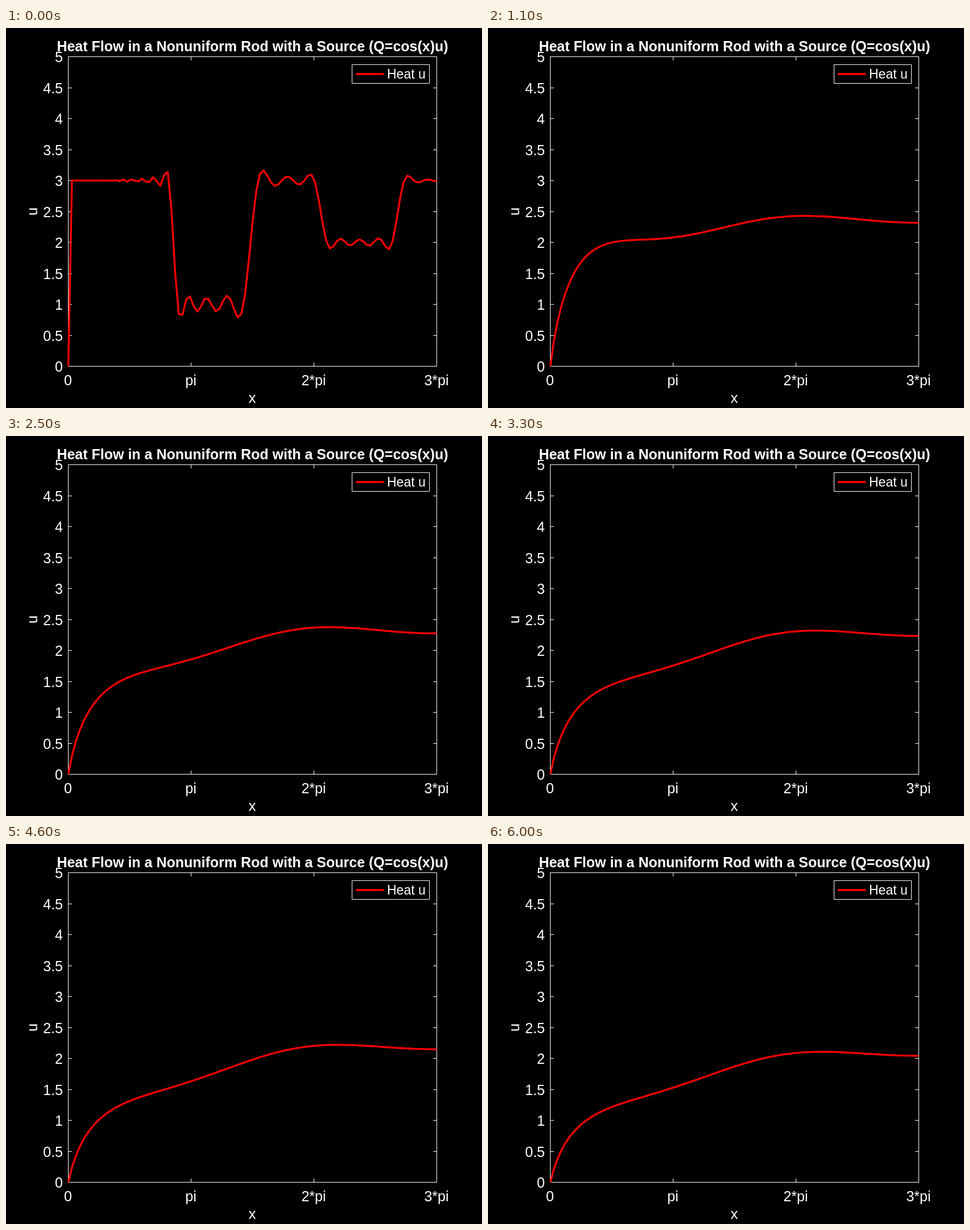
Recreate the animation shown at these times as an HTML page with a canvas. Size 837 by 669 pixels, loop 6100 ms.

```html
<!DOCTYPE html>
<html lang="en">
<head>
<meta charset="utf-8">
<title>Heat flow in a rod</title>
<style>
  html, body { margin: 0; width: 100%; height: 100%; overflow: hidden; background: #000; }
  canvas { display: block; }
</style>
</head>
<body>
<canvas id="stage" width="837" height="669"></canvas>
<script>
const ctx = document.getElementById('stage').getContext('2d');
const FONT = '"Liberation Sans", Arial, Helvetica, sans-serif';
const BOX = { left: 109.5, right: 757.5, top: 50.5, bottom: 595.5 };
const FRAME_MS = 100, FRAMES = 61;

// capacity * u_t = (conductivity * u_x)_x + cos(x) * u,  u = 0 on the left, u_x = 0 on the right.
const CELLS = 100, MODES = 50, H = 3 * Math.PI / CELLS;
const conductivity = x => 1 + 4 * x;
const capacity = x => 21 * (1.25 + 0.65 * Math.sin(x) + 0.165 * x);
const startHeat = s => s < 0.285 ? 3 : s < 0.495 ? 1 : s < 0.685 ? 3 : s < 0.895 ? 2 : 3;

// Eigenpairs of a symmetric matrix by Jacobi rotations, lowest value first.
function eigenpairs(a) {
  const n = a.length;
  const vectors = a.map((_, i) => a.map((_, j) => +(i === j)));
  const turn = (row1, row2, k1, k2, c, s) => {
    const p = row1[k1], q = row2[k2];
    row1[k1] = c * p - s * q;
    row2[k2] = s * p + c * q;
  };
  for (let sweep = 0; sweep < 12; sweep++) {
    for (let p = 0; p < n; p++) {
      for (let q = p + 1; q < n; q++) {
        if (Math.abs(a[p][q]) < 1e-11) continue;
        const theta = (a[q][q] - a[p][p]) / (2 * a[p][q]);
        const t = (theta < 0 ? -1 : 1) / (Math.abs(theta) + Math.hypot(theta, 1));
        const c = 1 / Math.hypot(t, 1), s = t * c;
        for (let k = 0; k < n; k++) turn(a[k], a[k], p, q, c, s);
        for (let k = 0; k < n; k++) {
          turn(a[p], a[q], k, k, c, s);
          turn(vectors[p], vectors[q], k, k, c, s);
        }
      }
    }
  }
  return vectors.map((vector, i) => ({ value: a[i][i], vector }))
    .sort((m, n) => m.value - n.value);
}

function buildModes() {
  const points = Array.from({ length: CELLS }, (_, i) => (i + 1) * H);
  const share = i => i === CELLS - 1 ? 0.5 : 1;
  const root = points.map((x, i) => Math.sqrt(capacity(x) * share(i)));
  const link = x => conductivity(x) / H ** 2;
  const matrix = points.map((x, i) => points.map((_, j) => {
    const right = i === CELLS - 1 ? 0 : link(x + H / 2);
    const entry = i === j ? link(x - H / 2) + right - Math.cos(x) * share(i)
      : j === i + 1 ? -right
      : j === i - 1 ? -link(x - H / 2) : 0;
    return entry / (root[i] * root[j]);
  }));
  return eigenpairs(matrix).slice(0, MODES).map(({ value, vector }) => {
    const weight = vector.reduce((sum, v, i) => sum + v * root[i] * startHeat((i + 1) / CELLS), 0);
    return { decay: value, shape: vector.map((v, i) => weight * v / root[i]) };
  });
}

const modes = buildModes();

function heatProfile(time) {
  const heat = new Array(CELLS + 1).fill(0);
  for (const { decay, shape } of modes) {
    const fade = Math.exp(-decay * time);
    shape.forEach((v, i) => { heat[i + 1] += v * fade; });
  }
  return heat;
}

const plotX = i => BOX.left + (BOX.right - BOX.left) * i / CELLS;
const plotY = u => BOX.bottom - (BOX.bottom - BOX.top) * u / 5;

function text(str, x, y, size, align = 'center', weight = '') {
  ctx.font = `${weight} ${size}px ${FONT}`;
  ctx.textAlign = align;
  ctx.fillText(str, x, y);
}

function line(x1, y1, x2, y2) {
  ctx.beginPath();
  ctx.moveTo(x1, y1);
  ctx.lineTo(x2, y2);
  ctx.stroke();
}

function drawAxes() {
  const { left, right, top, bottom } = BOX, tick = 6.5;
  ctx.strokeStyle = ctx.fillStyle = '#fff';
  ctx.lineWidth = 1;
  ctx.strokeRect(left, top, right - left, bottom - top);
  for (let k = 0; k <= 10; k++) {
    const y = Math.round(plotY(k / 2) - 0.5) + 0.5;
    line(left, y, left + tick, y);
    line(right, y, right - tick, y);
    text(String(k / 2), 100, y + 9, 25, 'right');
  }
  ['0', 'pi', '2*pi', '3*pi'].forEach((label, k) => {
    const x = left + (right - left) * k / 3;
    line(x, bottom, x, bottom - tick);
    line(x, top, x, top + tick);
    text(label, x - 0.5, 628.5, 25);
  });
  text('Heat Flow in a Nonuniform Rod with a Source (Q=cos(x)u)', 433.5, 41, 25, 'center', 'bold');
  text('x', 433, 660, 26);
  ctx.save();
  ctx.translate(55, 323);
  ctx.rotate(-Math.PI / 2);
  text('u', 0, 0, 26);
  ctx.restore();
}

function drawLegend() {
  ctx.strokeStyle = ctx.fillStyle = '#fff';
  ctx.lineWidth = 1;
  ctx.strokeRect(608.5, 64.5, 136, 33);
  text('Heat u', 670, 89, 23, 'left');
  ctx.strokeStyle = '#f00';
  ctx.lineWidth = 3.3;
  line(615, 81, 664.5, 81);
}

function drawCurve(profile) {
  ctx.strokeStyle = '#f00';
  ctx.lineWidth = 3.3;
  ctx.lineJoin = 'round';
  ctx.beginPath();
  profile.forEach((u, i) => ctx.lineTo(plotX(i), plotY(u)));
  ctx.stroke();
}

function render() {
  const step = Math.floor(performance.now() / FRAME_MS) % FRAMES;
  ctx.fillStyle = '#000';
  ctx.fillRect(0, 0, 837, 669);
  drawAxes();
  drawCurve(heatProfile(step));
  drawLegend();
  requestAnimationFrame(render);
}
render();
</script>
</body>
</html>
```
